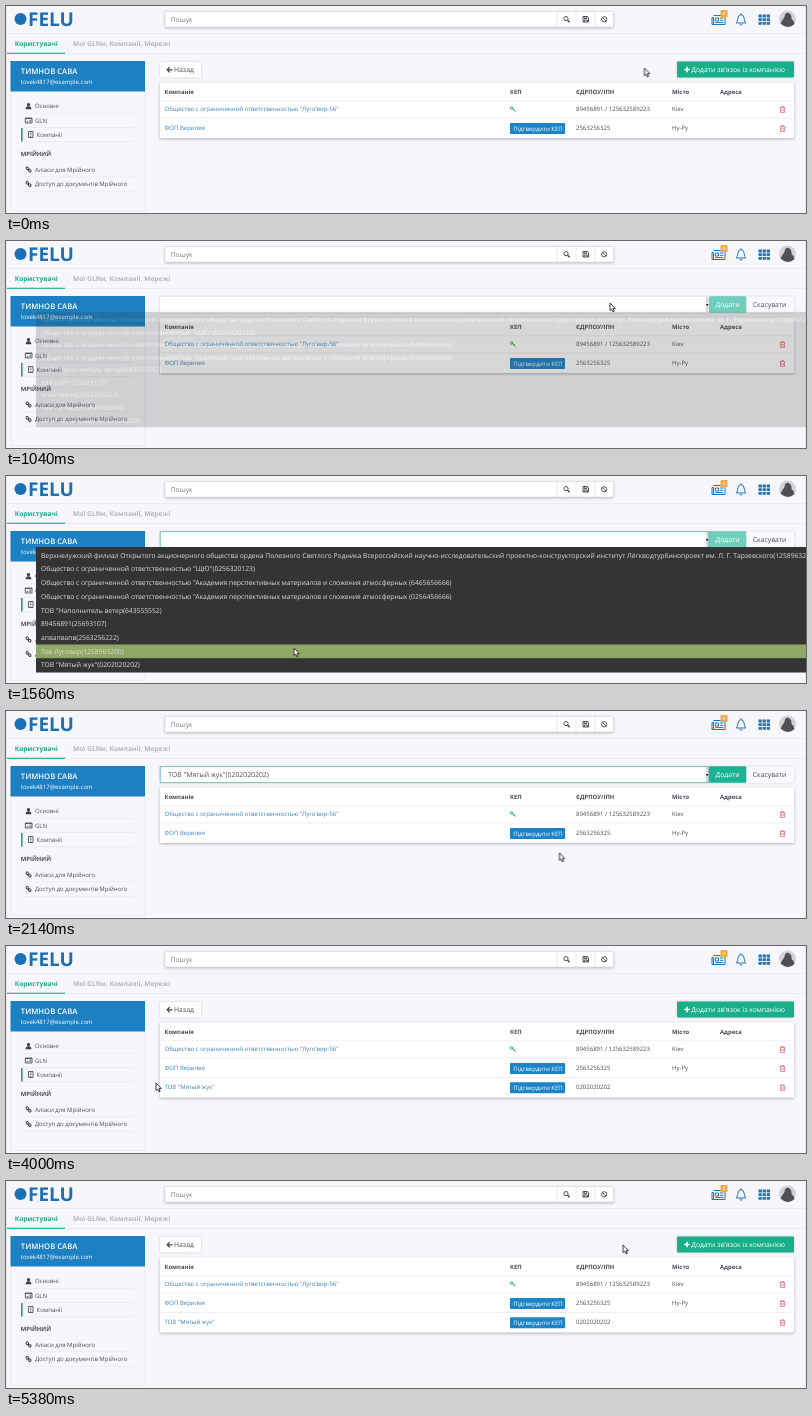
Write an HTML page that moves like this. It is 800 px wide and 207 px high and loops after 5460 ms.

```html
<!DOCTYPE html>
<html lang="uk">
<head>
<meta charset="utf-8">
<title>Користувачі</title>
<style>
  html, body { margin: 0; width: 100%; height: 100%; overflow: hidden; background: #f7f7fb; }
  svg { display: block; }
  text { font-family: "Open Sans", "Noto Sans", sans-serif; font-size: 6px; fill: #484d55; text-rendering: geometricPrecision; white-space: pre; }
  .b text, text.b { font-size: 5.9px; font-weight: 700; }
  .md { font-size: 6.85px; }
  .tab { font-size: 6.65px; font-weight: 700; fill: #b4b6bb; }
  .link { fill: #3b80b5; }
  .white { fill: #fff; }
  .menu text { font-size: 6.74px; fill: #dedede; }
  .shadow { filter: drop-shadow(0 1px 1.5px rgba(0, 0, 0, .28)); }
  .soft { filter: drop-shadow(0 .5px .8px rgba(0, 0, 0, .18)); }
  .line { stroke: #e4e5e9; stroke-width: .6; fill: none; }
  .icon { fill: none; stroke: #3c4148; stroke-width: .9; }

  /* One loop: every part shares the same clock. */
  .list, .pick, .before, .after, .chosen, .off, .hover, .focus, .arrow, .hand {
    animation: 5460ms step-end infinite;
  }
  .list   { animation-name: list; }
  .pick   { animation-name: pick; }
  .before { animation-name: before; }
  .after  { animation-name: after; }
  .chosen { animation-name: chosen; }
  .off    { animation-name: off; }
  .hover  { animation-name: hover; }
  .focus  { animation-name: focus; }
  .arrow  { animation-name: arrow; }
  .hand   { animation-name: hand; }
  .menu   { animation: menu 5460ms linear infinite; transform-origin: 30px 71px; }
  .mark   { animation: mark 5460ms step-end infinite; }
  .cursor { animation: cursor 5460ms linear infinite; }

  @keyframes list   { 0% { visibility: visible } 9.16% { visibility: hidden } 63%, 100% { visibility: visible } }
  @keyframes pick   { 0% { visibility: hidden } 9.16% { visibility: visible } 63%, 100% { visibility: hidden } }
  @keyframes before { 0% { visibility: visible } 63%, 100% { visibility: hidden } }
  @keyframes after  { 0% { visibility: hidden } 63%, 100% { visibility: visible } }
  @keyframes chosen { 0% { opacity: 0 } 33.7%, 100% { opacity: 1 } }
  @keyframes off    { 0% { opacity: .63 } 33.7%, 100% { opacity: 1 } }
  @keyframes hover  { 0% { opacity: 0 } 45.8%, 100% { opacity: 1 } }
  @keyframes focus  { 0% { opacity: 0 } 19.5% { opacity: 1 } 51.6%, 100% { opacity: 0 } }
  @keyframes arrow  { 0% { opacity: 1 } 3% { opacity: 0 } 10.5% { opacity: 1 } 45.8% { opacity: 0 } 63%, 100% { opacity: 1 } }
  @keyframes hand   { 0% { opacity: 0 } 3% { opacity: 1 } 10.5% { opacity: 0 } 45.8% { opacity: 1 } 63%, 100% { opacity: 0 } }
  @keyframes menu {
    0%, 18.315% { opacity: 0; transform: scaleY(.897) }
    22.1%, 33.7% { opacity: 1; transform: none }
    36.2%, 100% { opacity: 0; transform: none }
  }
  @keyframes mark {
    0% { opacity: 0; transform: none }
    20.6% { opacity: 1; transform: none; animation-timing-function: steps(7) }
    28.28% { opacity: 1; transform: translateY(95.9px) }
    30.86%, 100% { opacity: 1; transform: translateY(109.6px) }
  }
  @keyframes cursor {
    0% { transform: translate(638px, 62px); animation-timing-function: ease-out }
    6.4%, 9.5% { transform: translate(722px, 64px); animation-timing-function: ease-in-out }
    18.3% { transform: translate(604px, 62px) }
    19.8% { transform: translate(604px, 62px) }
    28.57% { transform: translate(288px, 172px) }
    29.7% { transform: translate(287px, 175px) }
    31.9%, 33.7% { transform: translate(284px, 188px) }
    39.2% { transform: translate(553px, 142px); animation-timing-function: ease-out }
    47.6%, 62.3% { transform: translate(725px, 60px); animation-timing-function: ease-in-out }
    72.2%, 81.5% { transform: translate(150px, 137px); animation-timing-function: ease-in }
    92.3% { transform: translate(430px, 94px); animation-timing-function: ease-out }
    98.5%, 100% { transform: translate(617px, 64px) }
  }
</style>
</head>
<body>
<svg width="800" height="207" viewBox="0 0 800 207">
  <defs>
    <g id="trash" fill="none" stroke="#e2707a" stroke-width=".75">
      <path d="M-2.8-2H2.8M-1-2V-3H1V-2M-2-2V3H2V-2M-.7-.6V1.8M.7-.6V1.8"/>
    </g>
    <g id="chain" fill="none" stroke="#3c4148" stroke-width="1">
      <rect x="-2.5" y="-2.3" width="2.7" height="2.2" rx="1" transform="rotate(45 -1.1 -1.2)"/>
      <rect x="-.2" y="0" width="2.7" height="2.2" rx="1" transform="rotate(45 1.1 1.2)"/>
    </g>
    <g id="confirm">
      <rect x="504" y="-5.5" width="55" height="11" rx=".8" fill="#1c84c6"/>
      <text class="white" x="507.3" y="2.2">Підтвердити КЕП</text>
      <use href="#trash" x="776.5"/>
    </g>
  </defs>

  <rect width="800" height="207" fill="#f7f7fb"/>
  <path class="line" d="M.5 0V207M799.5 0V207M0 27.5H800M0 47.5H800"/>

  <!-- Header -->
  <circle cx="14.5" cy="13" r="6" fill="#1b6fb5"/>
  <text class="b" x="22" y="20" style="font-size:19px;fill:#1b6fb5">FELU</text>
  <rect class="shadow" x="159" y="5.5" width="448.5" height="15.5" rx="1" fill="#fff"/>
  <path d="M551 5.5V21M570 5.5V21M589 5.5V21M159 5.5H607.5V21H159Z" fill="none" stroke="#d9dade" stroke-width=".6"/>
  <text x="164.7" y="15.5" style="font-size:6.75px;fill:#777b82">Пошук</text>
  <g class="icon">
    <circle cx="560" cy="12.6" r="2.1"/><path d="M561.6 14.2 563.6 16.2" stroke-width="1.3"/>
    <path d="M577 10.5H581.3L582.5 11.7V16H577ZM578.3 10.5V12.5H580.8V10.5M578.2 16V14H581.3V16"/>
    <circle cx="598.2" cy="13.3" r="2.6"/><path d="M596.4 11.5 600 15.1"/>
  </g>
  <g fill="none" stroke="#2074b6">
    <path d="M707.5 9.5H719V18.5H706V11.5H707.5V18M709.3 12H712.5V15H709.3ZM714 12H717.3M714 14.3H717.3M709.3 16.6H717.3"/>
    <path d="M730.3 17C732 15.5 731.5 11 733 9.5Q735 7.8 737 9.5C738.5 11 738 15.5 739.8 17ZM735 8.5V7.2M733.7 18.5Q735 19.8 736.3 18.5"/>
  </g>
  <rect x="714.5" y="4" width="7" height="7" rx="1" fill="#f5a742"/>
  <text class="white" x="716.6" y="9.4" style="font-size:5px">4</text>
  <path d="M752.5 10H764M752.5 13.7H764M752.5 17.4H764" stroke="#2074b6" stroke-width="2.8" stroke-dasharray="3.3 .8"/>
  <circle cx="781.5" cy="13" r="8.5" fill="#d3d3d6"/>
  <path d="M774.5 17.5Q777 13 778.5 11Q779 6 783 7Q786 9 785.5 13Q788.5 15 788.5 18Q782 24 774.5 17.5Z" fill="#505054"/>

  <!-- Tabs -->
  <text class="tab" x="8.8" y="39.7" style="fill:#20a98a">Користувачі</text>
  <text class="tab" x="67" y="39.7">Мої GLNи, Компанії, Мережі</text>
  <rect x="1" y="46.7" width="58" height="1.2" fill="#1ab394"/>

  <!-- Sidebar -->
  <path class="line" d="M5 85V204.5H139V85"/>
  <rect x="4.5" y="55" width="134.5" height="30.5" fill="#1c80c3"/>
  <text class="white" x="14.8" y="68" style="font-size:7.7px;font-weight:600">ТИМНОВ САВА</text>
  <text class="white" x="14.8" y="78.3">tovek4817@example.com</text>
  <path class="line" d="M15 107.3H128M15 121.5H128M15 135.7H128M15 170.8H128M15 185.3H128"/>
  <rect x="15" y="122" width="1.6" height="13.5" fill="#1fa387"/>
  <path d="M19.6 103.2Q19.6 100.3 22.5 100.3T25.4 103.2ZM20.8 98.6a1.7 1.7 0 1 1 3.4 0a1.7 1.7 0 1 1-3.4 0" fill="#3c4148"/>
  <g class="icon" style="stroke-width:.8">
    <path d="M19.3 112H26V117H19.3ZM19.3 112.6H26M20.7 115.7H22.5M23.5 114.3H25M23.5 115.7H25"/>
    <path d="M22.5 125.5H27V131.5H22.5ZM24 127H25.5M24 128.7H25.5M24.7 131.5V130"/>
  </g>
  <text x="29" y="102.3">Основні</text>
  <text x="29" y="116.5">GLN</text>
  <text x="30.5" y="130.7">Компанії</text>
  <text class="b" x="14.8" y="150.4">МРІЙНИЙ</text>
  <use href="#chain" x="22.5" y="163.5"/><text x="29" y="165.6">Аліаси для Мрійного</text>
  <use href="#chain" x="22.5" y="178"/><text x="29" y="180.2">Доступ до документів Мрійного</text>

  <!-- Toolbar: overview -->
  <g class="list">
    <rect class="soft" x="154" y="56" width="41" height="15.5" rx="1" fill="#fff"/>
    <path d="M166.5 63.8H161.3M163.7 61.2 161.1 63.8 163.7 66.4" fill="none" stroke="#3c4148" stroke-width="1.2"/>
    <text class="md" x="168" y="66.3">Назад</text>
    <rect class="soft" x="671" y="55.5" width="117" height="16" rx="1" fill="#1aaf8b"/>
    <path d="M678.3 63.5H683.7M681 60.8V66.2" stroke="#fff" stroke-width="1.5"/>
    <text class="md white" x="685.3" y="66.2">Додати зв'язок із компанією</text>
  </g>

  <!-- Toolbar: company picker -->
  <g class="pick">
    <rect class="soft" x="154" y="55.7" width="634" height="16" rx="1" fill="#fff"/>
    <rect x="740" y="55.7" width="48" height="16" fill="#fafafc"/>
    <rect x="699.7" y="56" width="3" height="15.4" fill="#dcdce0"/>
    <path d="M699.8 63H702.6L701.2 65.3Z" fill="#222"/>
    <rect class="focus" x="154.2" y="55.7" width="548.6" height="16" fill="none" stroke="#5fb5a4" stroke-width=".8"/>
    <text class="md chosen" x="162.3" y="66.3">ТОВ "Мятый жук"(0202020202)</text>
    <g class="off">
      <rect x="703" y="55.3" width="37.3" height="16.5" rx="1" fill="#1ab394"/>
      <rect class="hover" x="703" y="55.3" width="37.3" height="16.5" rx="1" fill="#18a384"/>
      <text class="md white" x="709.5" y="66.3">Додати</text>
    </g>
    <text class="md" x="746.8" y="66.3">Скасувати</text>
  </g>

  <!-- Table -->
  <g class="shadow">
    <rect class="before" x="154" y="76.5" width="634" height="55.5" fill="#fff"/>
    <rect class="after" x="154" y="76.5" width="634" height="75" fill="#fff"/>
  </g>
  <path class="line" d="M154 94.8H788M154 112H788"/>
  <g class="b">
    <text x="158.5" y="88.2">Компанія</text>
    <text x="504" y="88.2">КЕП</text>
    <text x="570" y="88.2">ЄДРПОУ/ІПН</text>
    <text x="666" y="88.2">Місто</text>
    <text x="714" y="88.2">Адреса</text>
  </g>
  <text class="link" x="158.5" y="105.3">Общество с ограниченной ответственностью "Луго'вир-56"</text>
  <path d="M504.4 102a1.2 1.2 0 1 1 2.4 0a1.2 1.2 0 1 1-2.4 0M506.5 102.9 509.5 105.5M508 104.3 508.9 103.3" fill="none" stroke="#2fa860"/>
  <text x="570" y="105.3">89456891 / 125632589223</text>
  <text x="666" y="105.3">Kiev</text>
  <use href="#trash" x="776.5" y="103.5"/>
  <text class="link" x="158.5" y="123.6">ФОП Верилея</text>
  <text x="570" y="123.6">2563256325</text>
  <text x="666" y="123.6">Ну-Ру</text>
  <use href="#confirm" y="122.5"/>
  <g class="after">
    <path class="line" d="M154 131.5H788"/>
    <text class="link" x="158.5" y="143.2">ТОВ "Мятый жук"</text>
    <text x="570" y="143.2">0202020202</text>
    <use href="#confirm" y="141.7"/>
  </g>

  <!-- Drop-down -->
  <g class="menu">
    <rect x="30" y="71" width="770" height="125.5" fill="#343434"/>
    <rect class="mark" x="30" y="72.5" width="770" height="13.7" fill="#8fa866"/>
    <text x="35" y="81.7">Верхнелужский филиал Открытого акционерного общества ордена Полезного Светлого Родника Всероссийский научно-исследовательский проектно-конструкторский институт Лёгкводтурбинопроект им. Л. Г. Тарзевского(1258963214)</text>
    <text x="35" y="95.4">Общество с ограниченной ответственностью "ЩЮ"(0256320123)</text>
    <text x="35" y="109.1">Общество с ограниченной ответственностью "Академия перспективных материалов и сложения атмосферных (6465656666)</text>
    <text x="35" y="122.8">Общество с ограниченной ответственностью "Академия перспективных материалов и сложения атмосферных (0256456666)</text>
    <text x="35" y="136.5">ТОВ "Наполнитель ветер(643555552)</text>
    <text x="35" y="150.2">89456891(25693107)</text>
    <text x="35" y="163.9">апвапвапв(2563256222)</text>
    <text x="35" y="177.6">Тов Луговир(1258963200)</text>
    <text x="35" y="191.3">ТОВ "Мятый жук"(0202020202)</text>
  </g>

  <!-- Pointer -->
  <g class="cursor" fill="#fff" stroke="#26282c" stroke-width=".9" stroke-linejoin="round">
    <path class="arrow" d="M0 0V7.6L1.7 6.1 2.9 8.8 4.2 8.2 3 5.6H5.3Z"/>
    <path class="hand" d="M-.7.6Q0-.4.7.6V3.2L3.8 3.9Q4.6 4.2 4.4 5.2L3.7 8.5H-.5L-2.7 5.4Q-2.6 4.2-.7 5.2Z"/>
  </g>
</svg>
</body>
</html>
```
